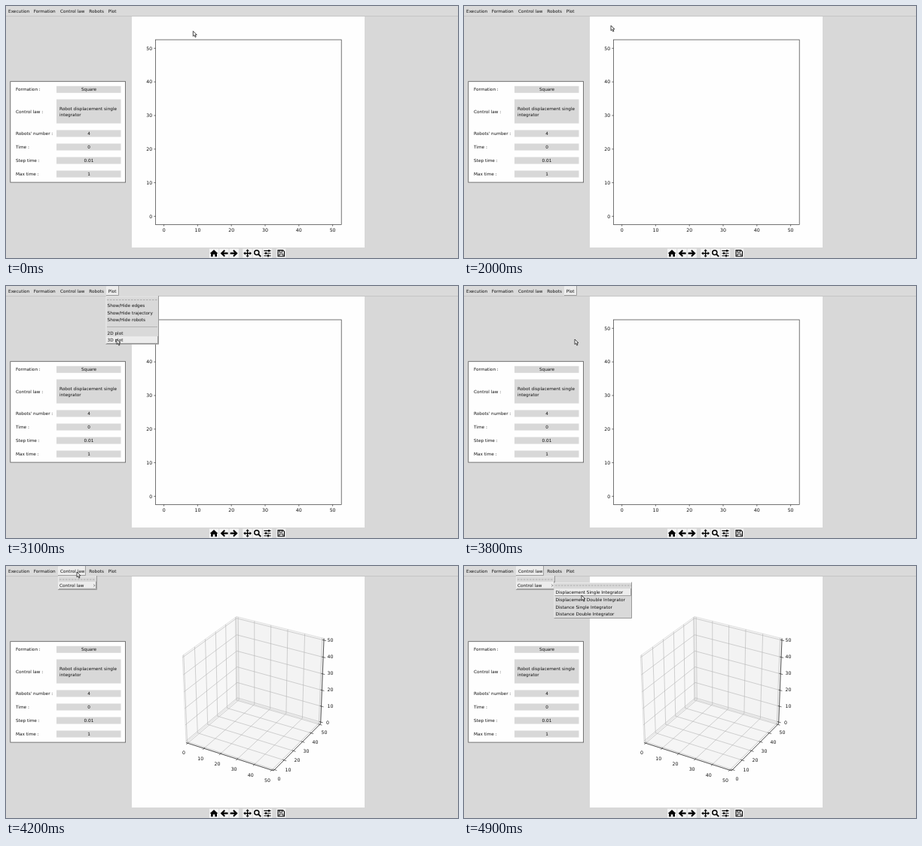
An HTML page that plays this animation: 600 px wide and 336 px high, repeating every 5 s.

```html
<!DOCTYPE html>
<html lang="en">
<head>
<meta charset="utf-8">
<style>
  html, body { margin: 0; height: 100%; overflow: hidden; background: #d8d8d8; }
  svg { display: block; width: 600px; height: 336px; }
  text { font: 5.75px "DejaVu Sans", sans-serif; fill: #111; text-rendering: geometricPrecision; }
  .tick { font-size: 6.2px; }
</style>
</head>
<body>
<svg id="stage" viewBox="0 0 600 336"></svg>
<script>
const LOOP = 5000, STEP = 100;
const stage = document.getElementById('stage');
const TENS = [0, 1, 2, 3, 4, 5];

// Pointer path: time, x, y
const POINTER = [
  [0, 248.3, 33.5], [1900, 248.3, 33.5], [2000, 195, 26], [2200, 141, 8], [2300, 141, 9],
  [2400, 142, 24], [2600, 147, 67], [2800, 147, 71], [3800, 147, 71], [3900, 140, 60],
  [4100, 100, 13], [4200, 94, 8], [4300, 95, 14], [4400, 102, 25], [4600, 139, 32], [4900, 156, 39]
];

const text = (s, x, y, anchor = 'start', cls = '') =>
  `<text x="${x}" y="${y + 2.1}" text-anchor="${anchor}" class="${cls}">${s}</text>`;
const rect = (x, y, w, h, fill, stroke = 'none', width = 1) =>
  `<rect x="${x}" y="${y}" width="${w}" height="${h}" fill="${fill}" stroke="${stroke}" stroke-width="${width}"/>`;
const path = (d, stroke, width = 1, fill = 'none', extra = '') =>
  `<path d="${d}" stroke="${stroke}" stroke-width="${width}" fill="${fill}" ${extra}/>`;
const raised = (x, y, w, h, fill) => rect(x, y, w, h, fill) +
  path(`M${x + .5} ${y + h - .5}v${1 - h}h${w - 1}`, '#f0f0f0', .8) +
  path(`M${x} ${y + h - .5}h${w - .5}v${-h}`, '#8a8a8a', .8);

function pointerAt(t) {
  const i = POINTER.findIndex(p => p[0] > t);
  if (i < 0) return POINTER.at(-1).slice(1);
  const [a, b] = [POINTER[i - 1], POINTER[i]], k = (t - a[0]) / (b[0] - a[0]);
  return [1, 2].map(j => a[j] + (b[j] - a[j]) * k);
}

function panel() {
  const rows = [
    ['Formation :', 111.3, 9, 'Square'], ['Control law :', 140.5, 32, ''],
    ["Robots' number :", 170, 9, '4'], ['Time :', 188, 9, '0'],
    ['Step time :', 206, 9, '0.01'], ['Max time :', 224, 9, '1']
  ];
  return rect(5.8, 100.7, 152.8, 134.4, '#fefefe', '#555', .8) +
    rows.map(([label, y, h, value]) => rect(67, y - h / 2, 85.5, h, '#d8d8d8') +
      text(label, 13, y) + text(value, 110, y, 'middle')).join('') +
    text('Robot displacement single', 71, 137) + text('integrator', 71, 144.5);
}

function toolbar() {
  const ink = '#000', y = 329.7;
  const buttons = [270, 283.3, 296.6, 314.3, 327.6, 341, 359]
    .map(x => rect(x, 323.7, 12.2, 12, '#f4f4f4')).join('');
  const arrow = (x, flip) => path('M-5 0L0-4.7 1.4-3.3-.6-1.2H4.9V1.2H-.6L1.4 3.3 0 4.7Z', 'none', 0, ink,
    `transform="translate(${x} ${y}) scale(${flip} 1)"`);
  return buttons + arrow(289.6, 1) + arrow(302.6, -1) +
    path(`M276 ${y - 4.6}l5.4 4.8h-1.4v4.3h-2.7v-2.9h-2.6v2.9h-2.7v-4.3h-1.4z`, 'none', 0, ink) +
    path(`M316.2 ${y}h8.8M320.6 ${y - 4.4}v8.8`, ink, 1.4) +
    path(`M320.6 ${y - 5.4}l2.2 2.4h-4.4zM320.6 ${y + 5.4}l2.2-2.4h-4.4zM315.2 ${y}l2.4-2.2v4.4zM326 ${y}l-2.4-2.2v4.4z`, 'none', 0, ink) +
    `<circle cx="332.8" cy="${y - 1}" r="3" fill="none" stroke="${ink}" stroke-width="1.5"/>` +
    path(`M335 ${y + 1.2}l3.2 3.2`, ink, 1.9) +
    path(`M342.4 ${y - 3.3}h9.2M342.4 ${y}h9.2M342.4 ${y + 3.3}h9.2`, ink, 1.1) +
    path(`M349 ${y - 4.7}v2.8M345 ${y - 1.4}v2.8M348 ${y + 1.9}v2.8`, ink, 1.8) +
    path(`M361 ${y - 4.2}h6.6l1.9 1.9v6.4h-8.5z`, ink, 1.1) +
    path(`M362.8 ${y - 3.8}h4v2.4h-4zM362.8 ${y + 3.8}v-2.8h5v2.8`, ink, .9);
}

function plot2d() {
  const ticks = TENS.map(i => {
    const x = 209.6 + 44.8 * i, y = 280.4 - 44.8 * i, label = i * 10;
    return path(`M${x} 291.5v2.2M198.5 ${y}h-2.2`, '#333', .7) +
      text(label, x, 298.5, 'middle', 'tick') + text(label, 194.2, y, 'end', 'tick');
  });
  return rect(198.5, 45, 246.7, 246.4, 'none', '#444', .75) + ticks.join('');
}

// Unit cube seen from elevation 30, azimuth -60
function project(x, y, z) {
  const [a, b, c] = [x - .5, y - .5, z - .5];
  const near = 1 - (.433 * a - .75 * b + .5 * c) / 10;
  return [329.7 + 134 * (.866 * a + .5 * b) / near,
          166.7 - 132.5 * (-.25 * a + .433 * b + .866 * c) / near];
}
const line = (...points) => 'M' + points.map(p => project(...p).map(n => n.toFixed(2))).join('L');

function plot3d() {
  const pane = (fill, ...points) => path(line(...points) + 'Z', '#d2d2d2', .6, fill);
  let out = pane('#f7f7f7', [0, 0, 0], [0, 1, 0], [0, 1, 1], [0, 0, 1]) +
    pane('#f3f3f3', [0, 1, 0], [1, 1, 0], [1, 1, 1], [0, 1, 1]) +
    pane('#f5f5f5', [0, 0, 0], [1, 0, 0], [1, 1, 0], [0, 1, 0]);
  const at = TENS.map(i => (i / 5 + 1 / 48) / (1 + 1 / 24));
  for (const v of at) {
    out += path(line([v, 0, 0], [v, 1, 0], [v, 1, 1]) + line([1, v, 0], [0, v, 0], [0, v, 1]) +
      line([0, 0, v], [0, 1, v], [1, 1, v]), '#b4b4b4', .6);
  }
  out += path(line([0, 0, 0], [1, 0, 0], [1, 1, 0], [1, 1, 1]), '#333', .8);
  at.forEach((v, i) => {
    const label = i * 10;
    out += path(line([v, -.025, 0], [v, .015, 0]) + line([.985, v, 0], [1.025, v, 0]) +
      line([.985, 1, v], [1.025, 1, v]), '#333', .7) +
      text(label, 236 + 22.2 * i, 249 + 7.4 * i, 'middle', 'tick') +
      text(label, 362.5 + 12 * i, 284 - 12.4 * i, 'middle', 'tick') +
      text(label, i ? 430.5 : 427, 208.5 - 22 * i, 'middle', 'tick');
  });
  return out;
}

function menu(x, y, w, h, rows, hot) {
  const active = rows.find(r => Math.abs(hot - r[1]) < 4.9);
  return raised(x, y, w, h, '#d9d9d9') +
    (active ? raised(x + 1, active[1] - 4.8, w - 2, 9.6, '#ececec') : '') +
    rows.map(([label, cy]) => text(label, x + 2, cy)).join('');
}
const tearOff = (x, y, w) => path(`M${x} ${y}h${w}`, '#9a9a9a', .7, 'none', 'stroke-dasharray="2.5 1.5"');

function plotMenu(y) {
  return menu(132.5, 13.5, 70.5, 64.5, [
    ['Show/Hide edges', 26], ['Show/Hide trajectory', 36], ['Show/Hide robots', 45.3],
    ['2D plot', 62.5], ['3D plot', 72.3]
  ], y - 2) + tearOff(134, 18.5, 67) + path('M134 54.5h67', '#aaa', .8);
}

function lawMenu(t, y) {
  let out = menu(69, 13.5, 52, 18.5, [['Control law', 26]], 26) + tearOff(71, 18, 48) +
    path('M116 24.5l2.2 1.5-2.2 1.5', '#777', .7);
  if (t >= 4400) {
    out += menu(119.5, 22, 103.5, 48, [
      ['', 26.2], ['Displacement Single Integrator', 35.3], ['Displacement Double Integrator', 45],
      ['Distance Single Integrator', 54.6], ['Distance Double Integrator', 64.2]
    ], Math.max(y - 2, 26)) + tearOff(121, 26, 101);
  }
  return out;
}

function menuBar(t) {
  const lit = (x, w) => raised(x, .5, w, 12.5, '#ececec');
  return rect(0, 0, 600, 13, '#dadada') + path('M0 13.5h600', '#c0c0c0', .8) +
    (t >= 2200 && t < 3900 ? lit(133, 17) : '') + (t >= 4100 ? lit(69, 37) : '') +
    [['Execution', 3], ['Formation', 36.7], ['Control law', 72], ['Robots', 110.3], ['Plot', 135.7]]
      .map(([s, x]) => text(s, x, 6.7)).join('');
}

const base = rect(0, 0, 600, 336, '#d8d8d8') + rect(167, 14, 309, 308, '#fefefe') + panel() + toolbar();
const flat = plot2d(), cube = plot3d();

function scene(t) {
  const [x, y] = pointerAt(t);
  return base + (t < 3900 ? flat : cube) + menuBar(t) +
    (t >= 2300 && t < 3800 ? plotMenu(y) : '') + (t >= 4200 ? lawMenu(t, y) : '') +
    path('M0 0V6.8L1.6 5.4 2.8 8.1 4 7.6 2.8 4.9H5Z', '#222', .8, '#f4f4f4', `transform="translate(${x} ${y})"`);
}

let shown = -1;
function tick() {
  const t = Math.floor(performance.now() % LOOP / STEP) * STEP;
  if (t !== shown) stage.innerHTML = scene(shown = t);
  requestAnimationFrame(tick);
}
tick();
</script>
</body>
</html>
```
